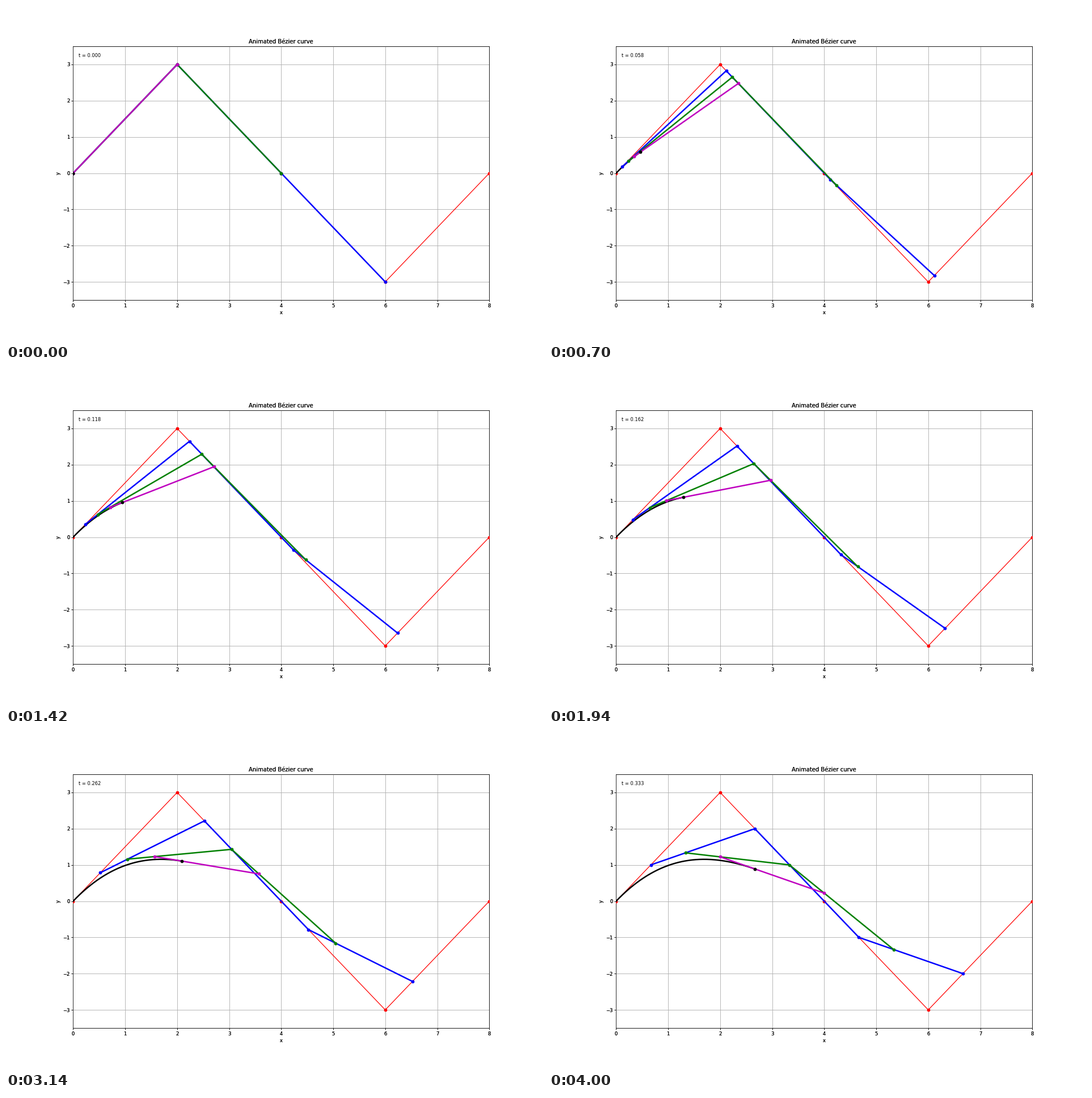
A matplotlib script for the animation above (6000 ms loop, 947 by 592 pixels).

```python
import numpy as np
import matplotlib.pyplot as plt
from matplotlib.animation import FuncAnimation

WIDTH, HEIGHT, DPI = 947, 592, 60
FRAMES, MOVING, STEPS = 300, 200, 600
RECT = [0.125, 0.125, 0.775, 0.755]
CONTROL = np.array([[0, 0], [2, 3], [4, 0], [6, -3], [8, 0]], float)
OVERDRAWS = 2

plt.rcParams["font.family"] = "DejaVu Sans"
fig = plt.figure(figsize=((WIDTH + 1e-6) / DPI, (HEIGHT + 1e-6) / DPI), dpi=DPI)


def add_chart():
    ax = fig.add_axes(RECT, facecolor="none", xlim=(0, 8), ylim=(-3.5, 3.5))
    ax.set(title="Animated Bézier curve", xlabel="x", ylabel="y")
    ax.grid(True)


def render_backdrop():
    """Stack the still chart on itself, which hardens its antialiased edges."""
    for _ in range(OVERDRAWS):
        add_chart()
    fig.canvas.draw()
    pixels = np.array(fig.canvas.buffer_rgba())
    fig.clear()
    return pixels


def reduce_points(points, t):
    """One de Casteljau step."""
    return (1 - t) * points[:-1] + t * points[1:]


def curve_point(t):
    points = CONTROL
    while len(points) > 1:
        points = reduce_points(points, t)
    return points[0]


fig.figimage(render_backdrop(), origin="upper", zorder=-1)
ax = fig.add_axes(RECT, xlim=(0, 8), ylim=(-3.5, 3.5))
ax.axis("off")

times = np.arange(MOVING + 1) / STEPS
path = np.array([curve_point(t) for t in times])
ax.plot(*CONTROL.T, "ro-", lw=1.5)
curve, = ax.plot([], [], "k-", lw=3)
levels = [ax.plot([], [], color + "o-", lw=3)[0] for color in "bgm"]
tip, = ax.plot([], [], "ko")
label = ax.text(0.1, 3.2, "")


def update(frame):
    step = min(frame, MOVING)
    t = times[step]
    points = CONTROL
    for line in levels:
        points = reduce_points(points, t)
        line.set_data(*points.T)
    curve.set_data(*path[:step + 1].T)
    tip.set_data(*path[step:step + 1].T)
    label.set_text(f"t = {t:.3f}")
    return [curve, *levels, tip, label]


anim = FuncAnimation(fig, update, frames=FRAMES, interval=20, repeat=True,
                     repeat_delay=0, blit=False)
plt.show()
```
